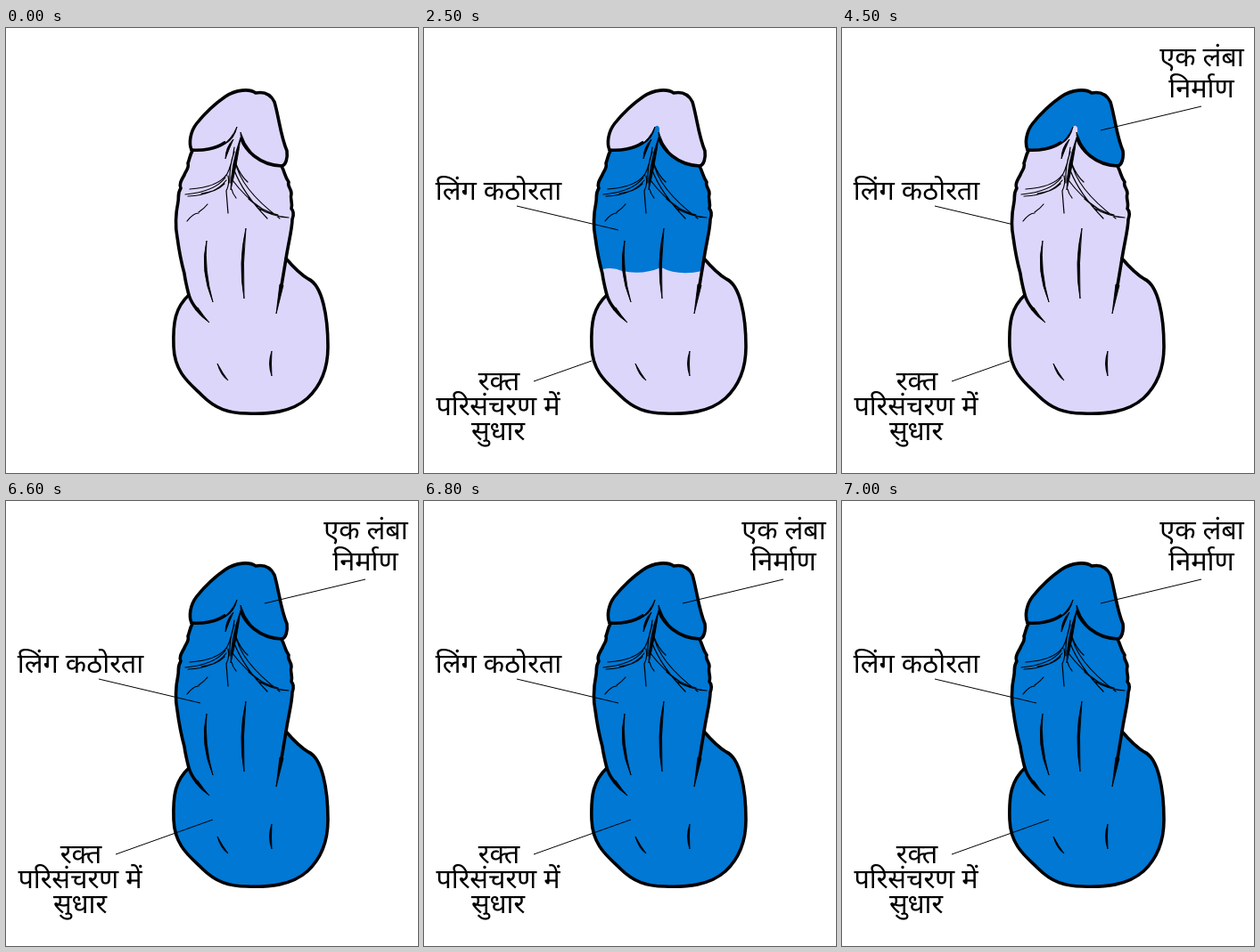
An HTML page that plays this animation: 462 px wide and 500 px high, repeating every 8000 ms.

```html
<!DOCTYPE html>
<html lang="hi">
<head>
<meta charset="utf-8">
<style>
  html, body { margin: 0; height: 100%; overflow: hidden; background: #fff; }
  svg { display: block; width: 100%; height: 100%; }
  text { font: 30.7px "Noto Sans Devanagari", "Noto Sans", sans-serif; text-anchor: middle; }
  line { stroke: #000; }
  .ink { fill: none; stroke: #000; stroke-width: 3.6; stroke-linecap: round; stroke-linejoin: round; }
  .fold { fill: none; stroke: #000; stroke-width: 1.2; stroke-linecap: round; }
  .crease { stroke: #000; stroke-width: .9; stroke-linejoin: round; }
</style>
</head>
<body>
<svg viewBox="0 0 462 500">
  <defs>
    <path id="outline" d="M208 137C205 130 206 117 214 107C222 97 233 86 246 77C258 69 273 68 280 73C290 71 297 75 301 83C306 100 308 122 315 138C316 146 314 154 309 155C313 163 313 168 317 173C315 178 320 180 320 186C318 192 322 196 320 203C324 207 322 212 321 215C321 225 317 240 314 259C320 266 329 276 339 282C355 289 361 325 361 358C361 385 352 403 338 416C320 432 295 434 270 433C250 433 235 428 220 413C207 400 189 388 188 358C187 330 190 314 205 300C203 292 201 284 200 276C197 265 194 250 192 235C190 225 190 210 193 195C194 190 192 186 196 180C194 176 196 172 200 165C201 161 206 157 204 152C206 147 206 143 209 138Z"/>
    <clipPath id="inside"><use href="#outline"/></clipPath>
  </defs>
  <use id="body" href="#outline"/>

  <g fill="#0078d4" clip-path="url(#inside)">
    <path id="base" d="M180 271H200Q212 268 222 273Q245 278 266 269Q285 279 312 273V255H370V440H180Z"/>
    <path id="shaft" d="M180 271H200Q212 268 222 273Q245 278 266 269Q285 279 312 273V258H330V155H309C298 155 283 150 274 140C267 132 264 126 264 112Q261 107 258 113C256 120 252 125 245 129C235 136 220 138 208 137H180Z"/>
    <path id="head" d="M208 137C220 138 235 136 245 129C252 125 256 120 258 113Q261 107 264 112C264 126 267 132 274 140C283 150 298 155 309 155H330V60H200Z"/>
  </g>

  <g id="labels">
    <g>
      <line x1="123" y1="397"/>
      <text x="84" y="407">रक्त</text>
      <text x="83" y="435">परिसंचरण में</text>
      <text x="83" y="463">सुधार</text>
    </g>
    <g>
      <line x1="104" y1="200"/>
      <text x="83.5" y="193">लिंग कठोरता</text>
    </g>
    <g>
      <line x1="403" y1="88"/>
      <text x="403.5" y="43">एक लंबा</text>
      <text x="403" y="78">निर्माण</text>
    </g>
  </g>

  <use class="ink" href="#outline"/>
  <path class="ink" stroke-width="3" d="M208 137C220 138 235 136 245 129M264 125C268 136 283 154 309 155M205 300Q208 309 214 316M314 259L309 289"/>
  <path class="crease" d="M243 131Q253 125 259 111Q256 125 246 130ZM263 117Q262 127 273 141L275 139Q267 130 263 117ZM263 123Q260 148 252 182Q252 154 263 123ZM255 125Q246 134 246 147Q250 136 255 125Z
    M212 316Q218 324 228 331Q221 323 215 314ZM307 288L303 321L311 289Z
    M225 239Q217 272 232 308Q222 272 225 239ZM269 225Q260 264 267 304Q265 264 269 225ZM298 363Q293 377 298 391Q297 377 298 363ZM237 377Q241 391 249 396Q243 388 237 377Z"/>
  <path class="fold" d="M256 134Q254 152 247 166M247 165Q237 179 206 181M246 168Q234 184 201 187M247 171Q234 188 204 189M245 175Q236 184 219 186M216 208Q210 208 203 217M216 207Q222 203 226 198
    M249 166Q251 175 247 183Q248 195 249 208M256 139Q250 155 251 174M257 149Q262 180 307 214M256 160Q266 186 293 214M254 171Q268 190 287 203M253 181Q254 186 258 191M258 153Q263 166 271 173M272 192Q287 206 305 210M282 202Q299 212 317 213"/>
</svg>
<script>
  const LAVENDER = '#ddd6fb', BLUE = '#0078d4', LOOP = 8000;
  // Leader lines reach inside a blue part, and stop at the edge otherwise.
  const parts = [
    { id: 'base', from: 500, inner: [232, 358], edge: [188, 374] },
    { id: 'shaft', from: 2500, inner: [218, 227], edge: [190, 220.4] },
    { id: 'head', from: 4500, inner: [290, 115], edge: [309, 110.2] }
  ];
  const body = document.getElementById('body');
  const labels = document.getElementById('labels').children;
  const show = (node, on) => node.setAttribute('visibility', on ? 'visible' : 'hidden');

  function draw(now) {
    const t = now % LOOP;
    const flash = t >= 7000 || (t >= 6500 && Math.floor((t - 6500) / 100) % 2 === 1);
    body.setAttribute('fill', flash ? BLUE : LAVENDER);
    parts.forEach(({ id, from, inner, edge }, i) => {
      const active = t >= from && t < from + 2000;
      show(document.getElementById(id), active);
      show(labels[i], t >= from);
      const line = labels[i].querySelector('line');
      const [x, y] = active || flash ? inner : edge;
      line.setAttribute('x2', x);
      line.setAttribute('y2', y);
    });
    requestAnimationFrame(draw);
  }
  draw(0);
</script>
</body>
</html>
```
